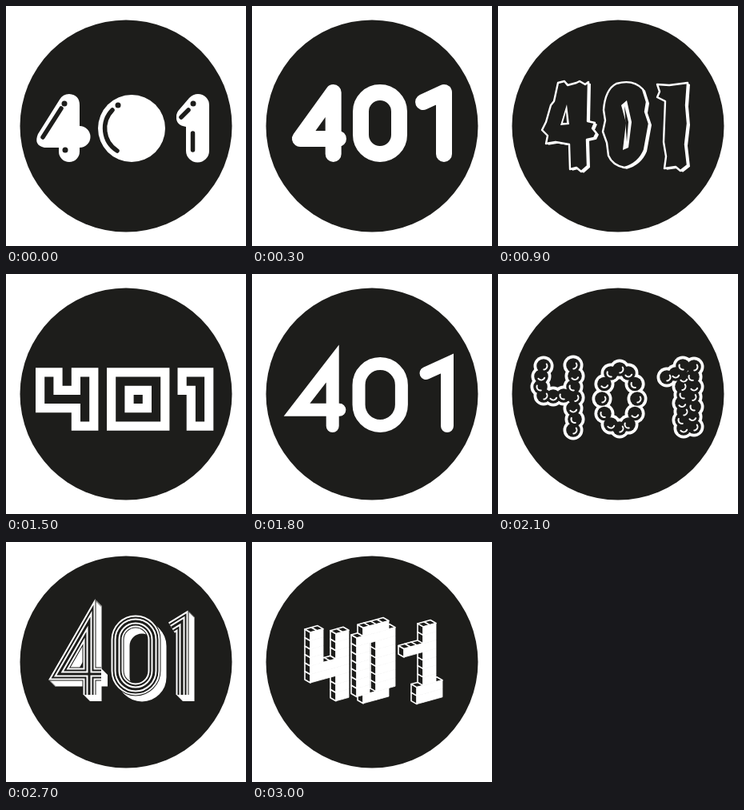
These frames come from a looping animation (300 px wide and 300 px high, 3300 ms). An HTML page with a canvas:

```html
<!DOCTYPE html>
<html lang="en">
<head>
<meta charset="utf-8">
<title>401</title>
<style>
html, body { margin: 0; height: 100%; overflow: hidden; background: #fff; }
canvas { display: block; width: 300px; height: 300px; }
</style>
</head>
<body>
<canvas width="300" height="300"></canvas>
<script>
const ctx = document.querySelector('canvas').getContext('2d');
const INK = '#1d1d1b', WHITE = '#fff', STEP = 300;

function fill(d, color = WHITE) {
  ctx.fillStyle = color;
  ctx.fill(new Path2D(d), 'evenodd');
}
function line(d, width, color = WHITE, cap = 'butt', join = 'miter') {
  Object.assign(ctx, { lineWidth: width, strokeStyle: color, lineCap: cap, lineJoin: join });
  ctx.stroke(new Path2D(d));
}
function disc(x, y, r, color = WHITE) {
  ctx.fillStyle = color;
  ctx.beginPath();
  ctx.arc(x, y, r, 0, 7);
  ctx.fill();
}
function shifted(x, y, draw) {
  ctx.save();
  ctx.translate(x, y);
  draw();
  ctx.restore();
}

// Plain digits inside a box, built from one or more nested strokes.
function plain(x, y, right, bottom, widths, join = 'miter') {
  const half = widths[0] / 2, w = right - x, dw = w * .34;
  const t = y + half, b = bottom - half, l = x + half;
  const stem = x + dw * .76, bar = y + (bottom - y) * .7;
  const zx = x + w * .38 + half, zr = zx + dw - 2 * half, r = (zr - zx) / 2;
  const ox = right - half;
  const d = `M${stem} ${b}V${t}L${l} ${bar}H${x + dw - half}
    M${zx} ${t + r}A${r} ${r} 0 0 1 ${zr} ${t + r}V${b - r}A${r} ${r} 0 0 1 ${zx} ${b - r}Z
    M${ox - w * .13} ${t + 12}L${ox} ${t}V${b}`;
  widths.forEach((v, i) => line(d, v, i % 2 ? INK : WHITE, 'round', join));
}

function glossy() {
  fill('M79 110Q92 111 92 124V150A13.5 13.5 0 0 1 92 177V182A13 13 0 0 1 66 182V177H48Q34 174 40 160L67 117Q71 110 79 110Z');
  disc(157, 153, 42);
  fill('M240 110A14 14 0 0 1 254 124V181A14 14 0 0 1 225 181V151Q212 149 213 138Q213 133 217 129L229 115Q234 110 240 110Z');
  line('M46 164L69 128M139 181A33 33 0 0 1 133 130M219 139L228 130M233.5 159V180', 5.5, INK, 'round');
  for (const [x, y] of [[73, 122], [74, 180], [140, 124], [234, 122]]) disc(x, y, 3.5, INK);
}

function dripping() {
  fill(`M74 102H104L103 146L114 148Q119 154 116 164Q113 168 110 160L104 165V186Q102 192 99 187Q96 191 92 190
    Q90 198 86 194Q81 188 82 174L66 172Q62 174 61 182Q57 187 55 179Q55 170 50 172Q44 160 47 152Q56 144 57 138Q68 120 74 102Z
    M84 127L72 148L84 147Z`);
  fill(`M154 102Q122 104 122 152Q122 180 131 184L137 190Q139 201 144 191Q155 199 168 189Q170 206 175 205Q178 202 177 185
    Q187 174 186 150Q186 104 154 102ZM151 127Q160 125 161 150Q160 168 154 170Q149 150 151 127Z`);
  fill(`M217 102H247Q250 120 249 172Q254 180 250 188L246 196Q243 203 239 194Q232 198 222 190Q219 180 223 160V132
    Q214 128 207 140Q203 147 201 138Q194 140 193 130Q196 120 209 117Z`);
}

function ragged() {
  const digits = [
    'M75 96L83 94L87 99L98 96L102 94L109 98L113 95L112 144L121 146L118 153L123 159L120 165L111 167L112 200L104 207L98 202L90 204L89 173L72 170L60 172L62 162L55 155L60 145L66 124L70 119Z',
    'M148 97Q169 91 181 104L186 120L184 132L189 147L183 180Q176 197 158 202Q143 199 138 187L136 171L131 157L134 143L132 130Q134 104 148 97Z',
    'M199 98L214 99L237 96L235 124L237 147L234 173L237 199L228 206L222 201L208 203L210 188L207 170L209 119L199 114L202 107Z'
  ];
  for (const d of digits) {
    for (let i = 3; i > 0; i--) shifted(i, i * .6, () => fill(d));
    fill(d, INK);
    line(d, 2.4, WHITE, 'round', 'round');
  }
  fill('M86 123L89 148L78 149ZM154 124L161 118L167 145L163 177L156 180L160 146Z');
  fill('M85 132L86 146L81 146ZM158 125L163 145L161 170Z', INK);
}

function maze() {
  const digits = {
    37: 'M.5 .5H2.5V2.5H4.5V.5H6.5V6.5H4.5V4.5H.5Z',
    126: 'M.5 .5H6.5V6.5H.5ZM2.5 2.5H4.5V4.5H2.5Z',
    214.5: 'M.5 .5H3.5V6.5H1.5V2.5H.5Z'
  };
  for (const x in digits) shifted(+x, 117.3, () => {
    ctx.scale(11.2, 11.2);
    line(digits[x], 1);
  });
}

function bubbles() {
  const digits = [[[57, 115], [54, 128], [53, 141], [57, 152], [69, 153], [82, 152]], [], [[211, 129], [222, 125], [231, 115]]];
  for (let i = 0; i < 7; i++) {
    digits[0].push([94 + i % 2 * 2, 114 + i * 13.5]);
    digits[2].push([245 - i % 2 * 2, 116 + i * 12.5], [232 - i % 2 * 2, 130 + i * 10.5]);
  }
  for (let a = 0; a < 6.2; a += Math.PI / 6)
    digits[1].push([152 + 22 * Math.cos(a), 156 + 37 * Math.sin(a)]);
  for (const dots of digits) {
    for (const [x, y] of dots) disc(x, y, 12.5);
    for (const [x, y] of dots) disc(x, y, 8.8, INK);
    dots.forEach(([x, y], i) => {
      ctx.lineWidth = 2;
      ctx.strokeStyle = WHITE;
      ctx.beginPath();
      ctx.arc(x, y, 4.5, i % 3 - .6, i % 3 + 1.5);
      ctx.stroke();
    });
  }
}

function striped() {
  const digits = [
    'M104 191V99L66 165H119',
    'M139 122A23 23 0 0 1 185 122V161A23 23 0 0 1 139 161Z',
    'M220 191V99L207 107'
  ];
  for (const d of digits) {
    for (let i = 0; i <= 8; i++) shifted(i, i, () => line(d, 15));
    [17, 15, 11, 7, 3].forEach((w, i) => line(d, w, i % 2 ? WHITE : INK));
  }
}

function blocks() {
  const solid = [
    [73, 113, 6, 9, (c, r) => c < 2 && r < 6 || c > 3 && r > 0 || r > 3 && r < 6],
    [131, 109.5, 6, 9, (c, r) => (c > 0 && c < 5 || r > 0 && r < 8) && !(c == 2 && r > 1 && r < 8)],
    [190, 112.5, 6, 9, (c, r) => r > 6 && c > 1 || c > 2 && c < 5 || r == 2 && c < 4]
  ];
  for (const [x0, y0, cols, rows, test] of solid) {
    const has = (c, r) => c >= 0 && r >= 0 && c < cols && r < rows && test(c, r);
    const each = draw => {
      for (let r = rows - 1; r >= 0; r--)
        for (let c = cols - 1; c >= 0; c--)
          if (has(c, r)) shifted(x0 + c * 8, y0 + r * 10.5 - c * 2.2, () => draw(c, r));
    };
    const tile = d => { fill(d, INK); line(d, 1.6, WHITE, 'round', 'round'); };
    each((c, r) => {
      if (!has(c - 1, r)) tile('M0 0L-7 -4V6.5L0 10.5Z');
      if (!has(c, r - 1)) tile('M0 0L-7 -4L1 -6.2L8 -2.2Z');
    });
    each(() => { fill('M0 0L8 -2.2V8.3L0 10.5Z'); line('M0 0L8 -2.2V8.3L0 10.5Z', .8); });
  }
}

const scenes = [
  glossy,
  () => plain(50, 98, 250, 195, [20], 'round'),
  dripping,
  ragged,
  () => plain(38, 105, 264, 196, [22, 12], 'round'),
  maze,
  () => plain(48, 104, 252, 198, [16]),
  bubbles,
  () => plain(41, 102, 251, 205, [22, 16, 6], 'round'),
  striped,
  blocks
];

function render() {
  ctx.fillStyle = WHITE;
  ctx.fillRect(0, 0, 300, 300);
  disc(150, 150, 132.5, INK);
  scenes[Math.floor(performance.now() / STEP) % scenes.length]();
  requestAnimationFrame(render);
}
render();
</script>
</body>
</html>
```
